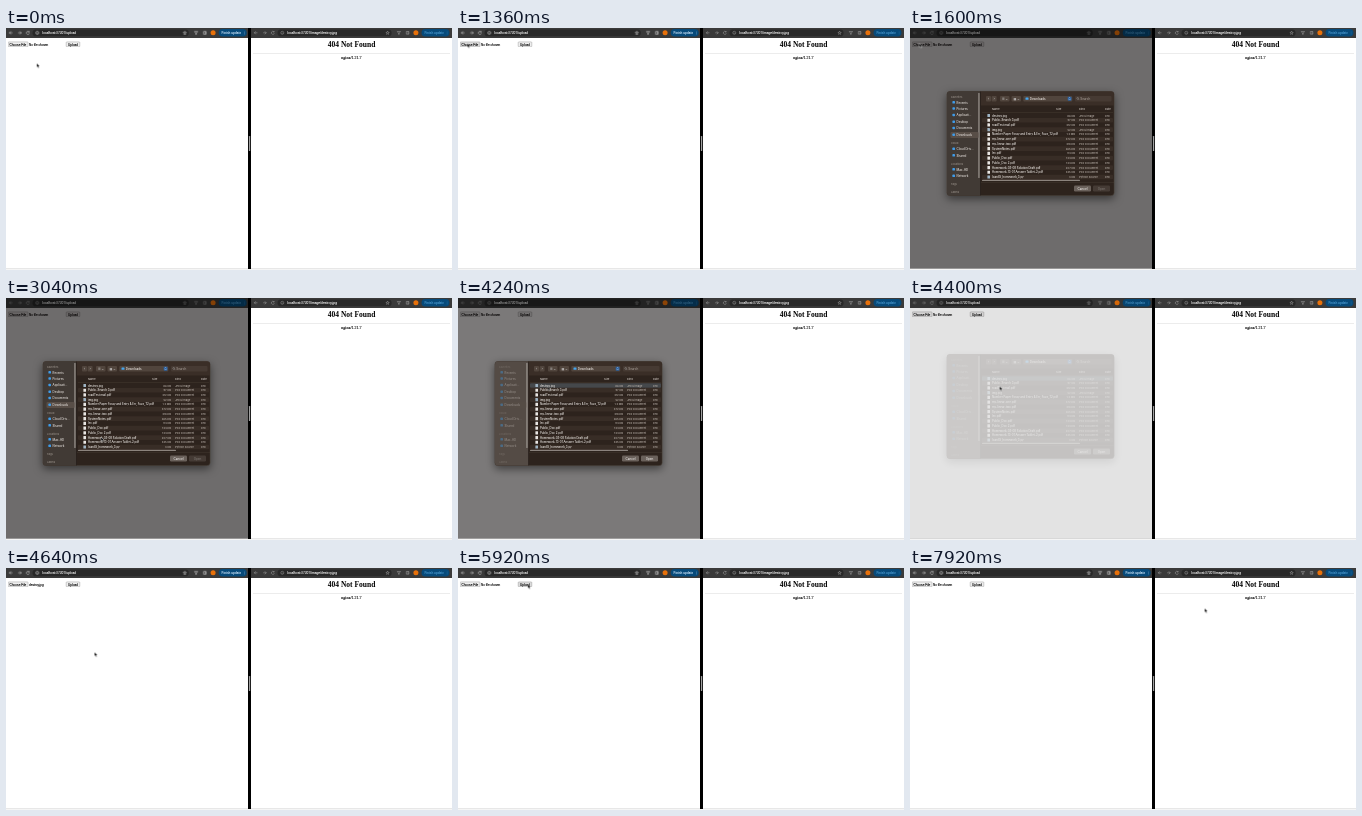
An HTML page for the animation above (8 s loop, 446 by 242 pixels).

```html
<!DOCTYPE html>
<html lang="en">
<head>
<meta charset="utf-8">
<title>File upload</title>
<style>
html, body { margin: 0; width: 100%; height: 100%; overflow: hidden; background: #fff; }
svg { display: block; width: 100vw; height: 100vh; }
text { font-family: "Liberation Sans", Arial, sans-serif; white-space: pre; }
.serif { font-family: "Liberation Serif", Times, serif; text-anchor: middle; }
.ui { font-family: Inter, "Open Sans", sans-serif; font-weight: 500; }
.ink { stroke: #000; stroke-width: .1; }
.url { stroke: #fff; stroke-width: .08; }
.mid { text-anchor: middle; }
.end { text-anchor: end; }
.line { fill: none; stroke: #d6d6d6; stroke-width: .55; }
.btn { fill: #efefef; stroke: #767676; stroke-width: .35; }
.pill { font-weight: 700; }
#right .line { opacity: .6; }
#right .pill { fill: #4b9bd0; }

#left .line, #left .pill, .btn, .file, .empty, #pick, #open, #side, #panel, #cursor, #shade, #dialog {
  animation: 8s step-end infinite;
}
#left .line { animation-name: fade-icons; }
#left .pill { animation-name: fade-pill; }
#choose { animation-name: hover-choose; }
#upload { animation-name: hover-upload; }
.file { animation-name: named; }
.empty { animation-name: unnamed; }
#pick { animation-name: picked; }
#open { animation-name: enable; }
#side { animation-name: calm; }
#panel { animation-name: lighten; }
#shade { animation-name: shade; animation-timing-function: linear; }
#dialog {
  animation-name: sheet;
  animation-timing-function: linear;
  filter: drop-shadow(0 3.5px 4px rgba(0, 0, 0, .5));
}
#cursor { animation-name: move; animation-timing-function: ease-in-out; }

@keyframes fade-icons { 0%, 58% { opacity: 1; } 19% { opacity: .6; } }
@keyframes fade-pill { 0%, 58% { fill: #d3ebff; } 19% { fill: #4b9bd0; } }
@keyframes hover-choose {
  0%, 12% { fill: #efefef; }
  7% { fill: #dcdcdc; }
  10% { fill: #f5f5f5; }
  12% { fill: #dcdcdc; }
  19%, 100% { fill: #efefef; }
}
@keyframes hover-upload {
  0%, 75% { fill: #efefef; }
  63%, 70% { fill: #dcdcdc; }
  68% { fill: #f5f5f5; }
}
@keyframes named { 0%, 70% { opacity: 0; } 56% { opacity: 1; } }
@keyframes unnamed { 0%, 70% { opacity: 1; } 56% { opacity: 0; } }
@keyframes picked { 0% { opacity: 0; } 47%, 100% { opacity: 1; } }
@keyframes enable { 0% { opacity: .4; } 47%, 100% { opacity: 1; } }
@keyframes calm { 0% { opacity: 1; } 52%, 100% { opacity: .4; } }
@keyframes lighten { 0% { fill: #413a35; } 52%, 100% { fill: #544b45; } }
@keyframes shade {
  0%, 18.99% { opacity: 0; }
  19% { opacity: .4; }
  20%, 52% { opacity: .575; }
  53% { opacity: .525; }
  54% { opacity: .32; }
  55% { opacity: .11; }
  56%, 100% { opacity: 0; }
}
@keyframes sheet {
  0%, 18.99% { opacity: 0; transform: translateY(-7px); }
  19% { opacity: .5; transform: translateY(-4px); }
  20%, 53% { opacity: 1; transform: none; }
  54% { opacity: .6; transform: translateY(-3px); }
  55% { opacity: .17; transform: translateY(-7px); }
  56%, 100% { opacity: 0; transform: translateY(-7px); }
}
@keyframes move {
  0%, 1% { transform: translate(30.7px, 35.3px); }
  7%, 20% { transform: translate(9.3px, 15.3px); }
  29% { transform: translate(88px, 104px); }
  36%, 40% { transform: translate(95px, 139px); }
  46%, 57% { transform: translate(89.6px, 88.3px); }
  63%, 74% { transform: translate(69.8px, 16.3px); }
  76%, 79.5% { transform: translate(110px, 25px); }
  83%, 90.5% { transform: translate(118px, 26.5px); animation-timing-function: ease-in; }
  95% { transform: translate(215px, 52px); animation-timing-function: ease-out; }
  99%, 100% { transform: translate(294.6px, 40.3px); }
}
</style>
</head>
<body>
<svg viewBox="0 0 446 242" preserveAspectRatio="none">
  <defs>
    <clipPath id="frame"><rect x="37" y="63.5" width="167" height="104" rx="3"/></clipPath>
  </defs>
  <rect width="446" height="242" fill="#fff"/>

  <g id="left"></g>
  <rect id="choose" class="btn" x="2.2" y="13.9" width="19.8" height="4.9" rx=".7"/>
  <text class="ink" x="3.6" y="17.5" font-size="3.15">Choose File</text>
  <text class="empty ink" x="23" y="17.5" font-size="3.05">No file chosen</text>
  <text class="file ink" x="23" y="17.5" font-size="3.05">destroy.jpg</text>
  <rect id="upload" class="btn" x="60.2" y="13.9" width="13.6" height="4.9" rx=".7"/>
  <text class="ink" x="62" y="17.5" font-size="3.15">Upload</text>

  <g id="right"></g>
  <text class="serif" x="345.6" y="18.9" font-size="7.5" font-weight="700">404 Not Found</text>
  <path d="M247 25.5H444" stroke="#d8d8d8" stroke-width=".5"/>
  <text class="serif ink" x="345.4" y="31.1" font-size="4">nginx/1.21.7</text>

  <path d="M0 240.8H446" stroke="#c4c4c4" stroke-width=".6"/>
  <g id="shade">
    <rect width="242" height="10" opacity=".75"/>
    <rect y="10" width="242" height="230.6" fill="#040000"/>
  </g>

  <g id="dialog">
    <rect x="36.8" y="63.3" width="167.4" height="104.4" rx="3.2" fill="#2d231d" stroke="#5d5650" stroke-width=".4"/>
    <g clip-path="url(#frame)">
      <rect id="panel" x="37" y="63" width="33.5" height="105"/>
      <rect x="70.5" y="63" width="134" height="14.5" fill="#3a2e27"/>
      <rect x="70.5" y="63" width=".4" height="105" fill="#17110e"/>
      <rect x="68.4" y="65" width="1.1" height="85" rx=".5" fill="#a39d98"/>
      <g id="side"></g>
      <g id="tools"></g>
      <g id="list"></g>
    </g>
  </g>

  <rect x="242" width="3" height="241" fill="#000"/>
  <rect x="242.9" y="108" width="1.3" height="15" rx=".6" fill="#a0a0a0"/>
  <path id="cursor" d="M0 0V4.1L1 3.2L1.7 4.8L2.4 4.5L1.7 3H3Z" fill="#000" stroke="#fff" stroke-width=".35"/>
</svg>

<script>
const $ = id => document.getElementById(id);
const rect = (x, y, w, h, fill, r = 0) =>
  `<rect x="${x}" y="${y}" width="${w}" height="${h}" rx="${r}" fill="${fill}"/>`;
const label = (x, y, s, fill, size = 3, cls = "ui") =>
  `<text class="${cls}" x="${x}" y="${y}" font-size="${size}" fill="${fill}">${s}</text>`;
const line = (x, d) => `<path class="line" transform="translate(${x} 4.8)" d="${d}"/>`;

// Browser toolbar: x = window edge, w = width, tail = x of the star icon
function toolbar(x, w, url, tail) {
  const back = "M1.7 0H-1.5M0 -1.5L-1.5 0L0 1.5";
  const fwd = "M-1.7 0H1.5M0 -1.5L1.5 0L0 1.5";
  const reload = "M1.2 -.9A1.5 1.5 0 1 0 1.5 .4M1.4 -1.7V-.7H.4";
  const info = "M-1.5 0A1.5 1.5 0 1 0 1.5 0A1.5 1.5 0 1 0 -1.5 0M0 -.2V.8";
  const star = "M0 -1.6L.5 -.5L1.6 -.4L.8 .4L1 1.6L0 1L-1 1.6L-.8 .4L-1.6 -.4L-.5 -.5Z";
  const box = "M-1.3 -1.3H1.3V1.4H-1.3Z";
  return rect(x, 0, w, 10, "#3a3a3a") +
    rect(x + 26.5, 1.4, tail - x - 22.5, 6.9, "#282828", 3.4) +
    line(x + 4.8, back) + line(x + 13.8, fwd) + line(x + 21.8, reload) +
    line(x + 31.3, info) + label(x + 36.2, 6, url, "#f2f2f2", 3.3, "url") +
    line(tail, star) + line(tail + 11.3, "M-1.6 -1.3H1.6L.4 .3V1.5H-.4V.3Z") +
    line(tail + 20, box + "M.4 -1.3V1.4") +
    `<circle cx="${tail + 28.3}" cy="4.8" r="2.5" fill="#e8710a"/>` +
    rect(tail + 33.9, 1, 28, 7.6, "#074a7a", 3.8) +
    label(tail + 36.8, 5.9, "Finish update  ⋮", "#d3ebff", 3, "pill");
}
$("left").innerHTML = toolbar(0, 242, "localhost:37207/upload", 178.8);
$("right").innerHTML = toolbar(245, 201, "localhost:37207/image/destroy.jpg", 381.6);

// Sidebar: headings have no icon
const places = [
  [70, "Favorites", 1], [75.5, "Recents"], [81.6, "Pictures"], [88.1, "Applicati…"],
  [94.8, "Desktop"], [101.2, "Documents"], [107.9, "Downloads"], [116, "Cloud", 1],
  [122, "Cloud Driv…"], [128.5, "Shared"], [136.5, "Locations", 1],
  [142.5, "Mac-HD"], [149, "Network"], [157, "Tags", 1], [165, "Labels", 1]
];
$("side").innerHTML = rect(40.5, 104, 28, 5.9, "#584e47", 1) + places.map(([y, s, head]) =>
  head ? label(41, y, s, "#989089", 2.6)
       : rect(42.4, y - 2.4, 2.6, 2.5, "#3f9be8", .7) + label(46.6, y, s, "#e4dfdb", 2.9)
).join("");

const field = "#51453d";
$("tools").innerHTML =
  rect(76, 68, 5, 5.4, field, 1) + rect(81.6, 68, 5, 5.4, field, 1) +
  label(78.5, 72, "‹", "#ddd", 4, "mid") + label(84.1, 72, "›", "#ddd", 4, "mid") +
  rect(90, 68, 9.5, 5.4, field, 1) + label(92, 71.8, "☰ ⌄", "#ddd") +
  rect(101.5, 68, 9.5, 5.4, field, 1) + label(103.5, 71.8, "▦ ⌄", "#ddd") +
  rect(113.3, 68, 49, 5.4, field, 1) + rect(115.5, 69.6, 3, 2.2, "#45a5ee", .4) +
  label(119.7, 71.8, "Downloads", "#f0ebe7") + rect(157.7, 68.7, 3.8, 4, "#2a5f9e", .9) +
  `<path d="M158.8 70.3l.8-.8l.8.8M158.8 71.2l.8.8l.8-.8" fill="none" stroke="#fff" stroke-width=".4"/>` +
  rect(165, 68, 36.5, 5.4, "#463a33", 1) +
  `<path d="M166.8 70.4a.9.9 0 1 0 1.8 0a.9.9 0 1 0-1.8 0M168.4 71.1l.9.9" fill="none" stroke="#bbb" stroke-width=".35"/>` +
  label(170.2, 71.8, "Search", "#a59b94");

const files = [
  ["destroy.jpg", "86 KB", "JPG"], ["Public-Search 3.pdf", "97 KB", "PDF"],
  ["roadTest mail.pdf", "412 KB", "PDF"], ["img.jpg", "52 KB", "JPG"],
  ["Number Paper Foray and Entry &amp; Err, Fuzz_T2.pdf", "1.2 MB", "PDF"],
  ["my-linear-one.pdf", "372 KB", "PDF"], ["my-linear-two.pdf", "418 KB", "PDF"],
  ["SystemNotes.pdf", "265 KB", "PDF"], ["lec.pdf", "94 KB", "PDF"],
  ["Public_Doc.pdf", "144 KB", "PDF"], ["Public_Doc 2.pdf", "144 KB", "PDF"],
  ["Homework-03-08 Solution Draft.pdf", "207 KB", "PDF"],
  ["Homework-13-01 Answer Tablet-2.pdf", "325 KB", "PDF"],
  ["loan45_homework_3.py", "3 KB", "PY"]
];
const kinds = { JPG: "JPEG image", PDF: "PDF Document", PY: "Python Source" };
const pale = "#b5aca5";
const rows = files.map(([name, size, kind], i) => {
  const y = 87.5 + i * 4.73;
  return (i % 2 ? rect(72, y - 2.35, 131, 4.7, "#382d26", .8) : "") +
    (i ? "" : `<g id="pick">${rect(72, y - 2.35, 131, 4.7, "#45484b", .8)}</g>`) +
    rect(77.4, y - 1.6, 2.6, 3.2, kind === "PDF" ? "#e9e6e3" : "#9fb4c4", .3) +
    label(82, y + 1.05, name, "#f4f0ec", 2.8) +
    label(165, y + 1.05, size, pale, 2.7, "ui end") +
    label(169, y + 1.05, kinds[kind], pale, 2.7) + label(195, y + 1.05, "Feb", pale, 2.7);
}).join("");
const heads = [[82, "Name"], [146, "Size"], [169, "Kind"], [195, "Date"]];
const button = (x, s) => rect(x, 157.5, 17, 6, "#6a615b", 1.2) +
  label(x + 8.5, 161.6, s, "#f3efec", 3, "ui mid");
$("list").innerHTML = heads.map(([x, s]) => label(x, 82.2, s, "#cfc7c1", 2.7)).join("") +
  rect(72, 84.3, 131, .3, "#53473f") + rows +
  rect(72, 151.8, 98, 1.2, "#8b837d", .6) + rect(70.9, 154, 133.1, .3, "#53473f") +
  button(164, "Cancel") + `<g id="open">${button(183, "Open")}</g>`;
</script>
</body>
</html>
```
